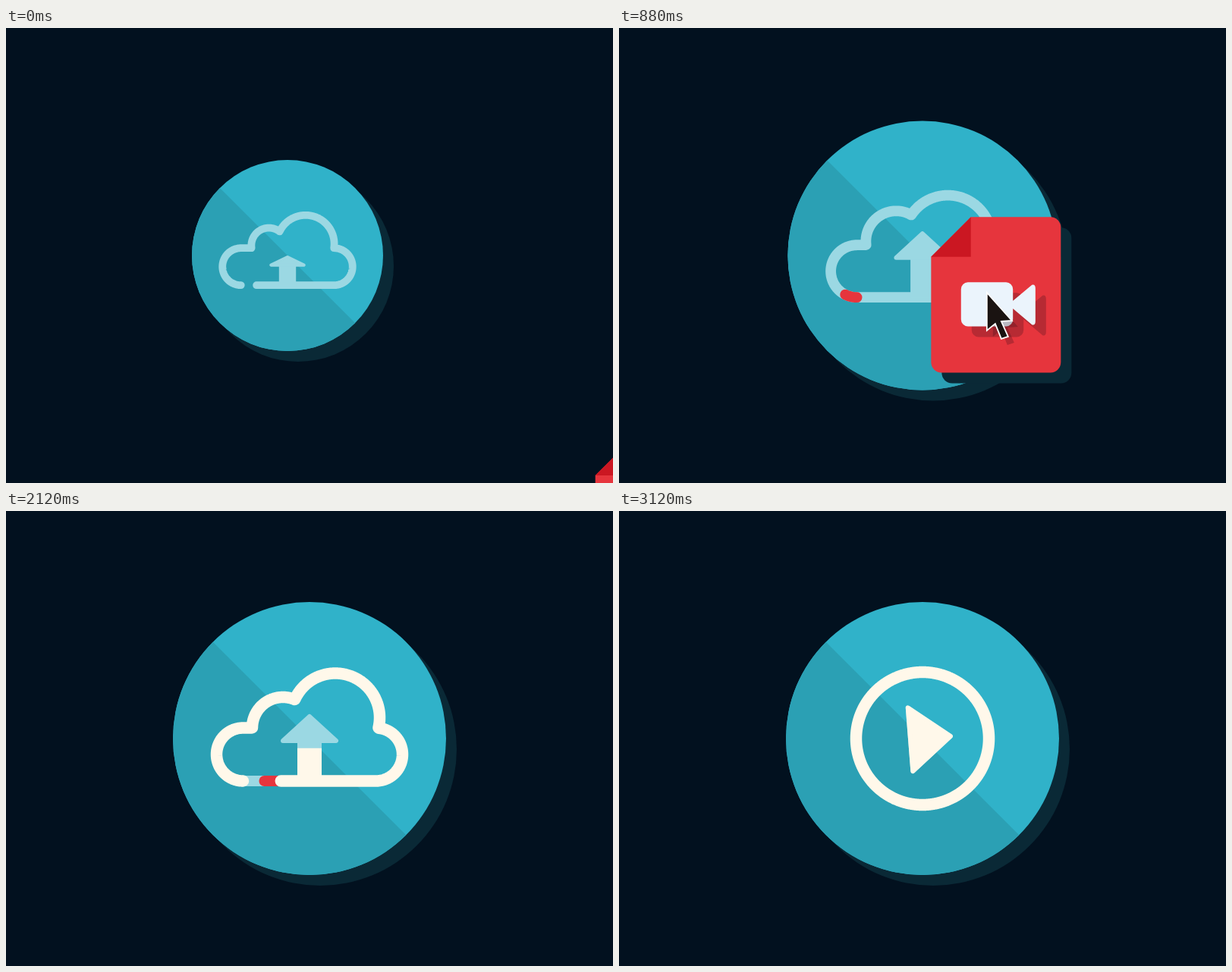
Write an HTML page with a canvas that moves like this. It is 800 px wide and 600 px high and loops after 3.16 s.

```html
<!DOCTYPE html>
<html lang="en">
<head>
<meta charset="utf-8">
<title>Cloud upload</title>
<style>
html, body { margin: 0; width: 100%; height: 100%; overflow: hidden; background: #02111f; }
canvas { display: block; }
</style>
</head>
<body>
<canvas id="stage" width="800" height="600"></canvas>
<script>
const ctx = document.getElementById('stage').getContext('2d');
const LOOP = 3160, STEP = 40, TAU = Math.PI * 2, DROP = 14;
const NAVY = '#02111f', SHADOW = '#0a2936', TEAL = '#30b2c9', DEEP = '#2ba0b4';
const PALE = '#9bd8e3', CREAM = '#fff8ea', RED = '#e6353d', FOLD = '#cb1722', WHITE = '#ebf4fc';
const TINT = 'rgba(40,10,20,.25)';

const mix = (a, b, u) => a + (b - a) * u;
const span = (t, from, to) => Math.min(1, Math.max(0, (t - from) / (to - from)));
const ease = (t, from, to) => { const u = span(t, from, to); return u * u * (3 - 2 * u); };
// Damped swing from 0 to 1.
const spring = (t, from) => {
  const d = Math.max(0, t - from);
  return 1 - Math.exp(-d / 180) * Math.cos(Math.PI * d / 280);
};

const morph = t => ease(t, 2240, 2680);
const settle = t => ease(t, 2680, 3120);
const staged = (t, first, second, third) => mix(mix(first, second, morph(t)), third, settle(t));
const head = t => Math.pow(span(t, 800, 2165), 1.3);
const tail = h => Math.max(0, h - .165 * Math.sqrt(h * (1 - h)));

function shape(points, color) {
  ctx.beginPath();
  points.forEach(p => ctx.lineTo(...p));
  ctx.closePath();
  ctx.fillStyle = color;
  ctx.fill();
}
function disc(x, y, r, color, from = 0, sweep = TAU) {
  ctx.beginPath();
  ctx.arc(x, y, r, from, from + sweep);
  ctx.fillStyle = color;
  ctx.fill();
}

// Cloud parts as circles (x, y, r), plus the top and bottom edges of the base capsule.
function cloudParts(t) {
  const cy = staged(t, 321, 304, 300), half = staged(t, 35, 78, 87.5);
  const run = staged(t, 122.5, 94, 87.5) - half;
  const grow = spring(t, 0), sink = morph(t);
  const puff = (x, y, r) => [mix(x, 400, sink), mix(y, 300, sink), mix(r, 40, sink)];
  return {
    cy, half, run,
    rounds: [
      puff(365, mix(281, 286, ease(t, 880, 1520)), mix(33, 40.5, grow)),
      puff(434, mix(278, 272.5, ease(t, 1520, 2120)), mix(54, 58.5, grow)),
      [400 - run, cy, half],
      [400 + run, cy, half]
    ]
  };
}

// Outline of the joined parts, found by casting rays from inside.
function outline(t) {
  const ox = 400, oy = 310, { cy, half, run, rounds } = cloudParts(t);
  const start = Math.atan2(cy + half - oy, -run), path = new Path2D();
  let length = 0, px, py;
  for (let i = 0; i <= 900; i++) {
    const a = start + TAU * i / 900, ux = Math.cos(a), uy = Math.sin(a);
    let reach = 0;
    for (const [x, y, r] of rounds) {
      const dx = x - ox, dy = y - oy, b = dx * ux + dy * uy;
      const q = r * r - dx * dx - dy * dy + b * b;
      if (q >= 0) reach = Math.max(reach, b + Math.sqrt(q));
    }
    const edge = (cy + Math.sign(uy) * half - oy) / uy;
    if (Math.abs(edge * ux) <= run) reach = Math.max(reach, edge);
    const x = ox + ux * reach, y = oy + uy * reach;
    path.lineTo(x, y);
    if (i) length += Math.hypot(x - px, y - py);
    px = x; py = y;
  }
  return { path, length };
}
function stroke({ path, length }, from, to, color, width) {
  if (to <= from) return;
  ctx.lineCap = ctx.lineJoin = 'round';
  ctx.lineWidth = width;
  ctx.strokeStyle = color;
  ctx.setLineDash(to - from >= 1 ? [] : [(to - from) * length, 9999]);
  ctx.lineDashOffset = -from * length;
  ctx.stroke(path);
  ctx.setLineDash([]);
}

// Points up as an upload arrow, then turns into the play triangle.
function arrow(t, color) {
  const grow = spring(t, 0);
  const tip = staged(t, mix(5, 37, grow), 36, 41);
  const base = staged(t, mix(-17, -2, grow), -18, -19);
  const half = staged(t, mix(34, 38, grow), 39.5, 45) - 3;
  const stem = staged(t, -52, -20, -15);
  ctx.save();
  ctx.translate(400, staged(t, 304, 303.5, 300));
  ctx.rotate(staged(t, 0, 90, 85.5) * Math.PI / 180);
  ctx.fillStyle = color;
  ctx.fillRect(-16, -base - 1, 32, Math.max(0, base - stem + 1));
  shape([[0, -tip + 4], [half, -base - 3], [-half, -base - 3]], color);
  ctx.lineWidth = 6;
  ctx.lineJoin = 'round';
  ctx.strokeStyle = color;
  ctx.stroke();
  ctx.restore();
}

function cloud(t) {
  const line = outline(t), h = head(t), end = tail(h);
  if (end < 1) stroke(line, 0, Math.min(1, .955 + t / 1780), PALE, 14);
  arrow(t, PALE);
  stroke(line, end, h, RED, 14);
  stroke(line, 0, end, CREAM, 15.5);
  ctx.save();
  ctx.beginPath();
  ctx.rect(200, mix(356, 200, span(t, 2020, 2380)), 400, 400);
  ctx.clip();
  if (t > 2020) arrow(t, CREAM);
  ctx.restore();
}

function button(t) {
  const x = 400 - 29 * Math.exp(-t / 159), r = mix(128, 180, spring(t, 380)) - 2 * (1 - span(t, 0, 280));
  disc(x + DROP, 300 + DROP, r, SHADOW);
  disc(x, 300, r, TEAL);
  disc(x, 300, r, DEEP, Math.PI / 4, Math.PI);
  ctx.save();
  ctx.translate(x, 300);
  ctx.scale(r / 180, r / 180);
  ctx.translate(-400, -300);
  cloud(t);
  ctx.restore();
}

function camera(out, color) {
  const left = -36 - 4.4 * out, right = left + 51 + 9 * out, far = right + 26 * out;
  const lens = (y, k) => 11.5 + y * k * out;
  ctx.fillStyle = color;
  ctx.beginPath();
  ctx.roundRect(left, -14.5, right - left, 51, 8);
  ctx.moveTo(right, lens(4.5, -1));
  ctx.lineTo(far - 4 * out, lens(23, -1));
  ctx.quadraticCurveTo(far, lens(24, -1), far, lens(19, -1));
  ctx.lineTo(far, lens(19, 1));
  ctx.quadraticCurveTo(far, lens(24, 1), far - 4 * out, lens(23, 1));
  ctx.lineTo(right, lens(4.5, 1));
  ctx.fill();
}

// Rounded page with its top left corner cut off.
function page(color) {
  const r = 12;
  ctx.beginPath();
  ctx.moveTo(-75, -44);
  ctx.lineTo(-29, -90);
  ctx.arcTo(75, -90, 75, 90, r);
  ctx.arcTo(75, 90, -75, 90, r);
  ctx.arcTo(-75, 90, -75, -44, r);
  ctx.closePath();
  ctx.fillStyle = color;
  ctx.fill();
}

function dropped(k, paint) {
  ctx.save();
  ctx.translate(DROP / k, DROP / k);
  paint();
  ctx.restore();
}

function file(t, x, y) {
  const size = 1 + .14 * ease(t, 560, 880) - 1.14 * ease(t, 880, 1100), out = ease(t, 280, 560);
  if (size < .01) return;
  ctx.save();
  ctx.translate(x, y);
  ctx.scale(size, size);
  dropped(size, () => page(SHADOW));
  page(RED);
  shape([[-75, -44], [-29, -90], [-29, -44]], FOLD);
  dropped(size, () => camera(out, TINT));
  camera(out, WHITE);
  ctx.restore();
}

function cursor(x, y) {
  const points = [[0, 0], [0, 50], [11, 41], [19, 61], [28, 58], [19, 38], [33, 37]];
  ctx.save();
  ctx.translate(x + 8, y + 8);
  shape(points, TINT);
  ctx.translate(-8, -8);
  shape(points, '#1a1311');
  ctx.lineWidth = 1.8;
  ctx.lineJoin = 'miter';
  ctx.strokeStyle = '#fff';
  ctx.stroke();
  ctx.restore();
}

function draw(t) {
  ctx.fillStyle = NAVY;
  ctx.fillRect(0, 0, 800, 600);
  button(t);
  const glide = Math.exp(-t / 216), x = 490.7 + 361 * glide, y = 347 + 287 * glide;
  file(t, x, y);
  const leave = ease(t, 1120, 1420);
  if (leave < 1) cursor(x - 12 + 335 * leave, y - 3 + 40 * leave);
}

const begin = performance.now();
function tick() {
  const t = (performance.now() - begin) % LOOP;
  draw(Math.floor(t / STEP) * STEP);
  requestAnimationFrame(tick);
}
tick();
</script>
</body>
</html>
```
